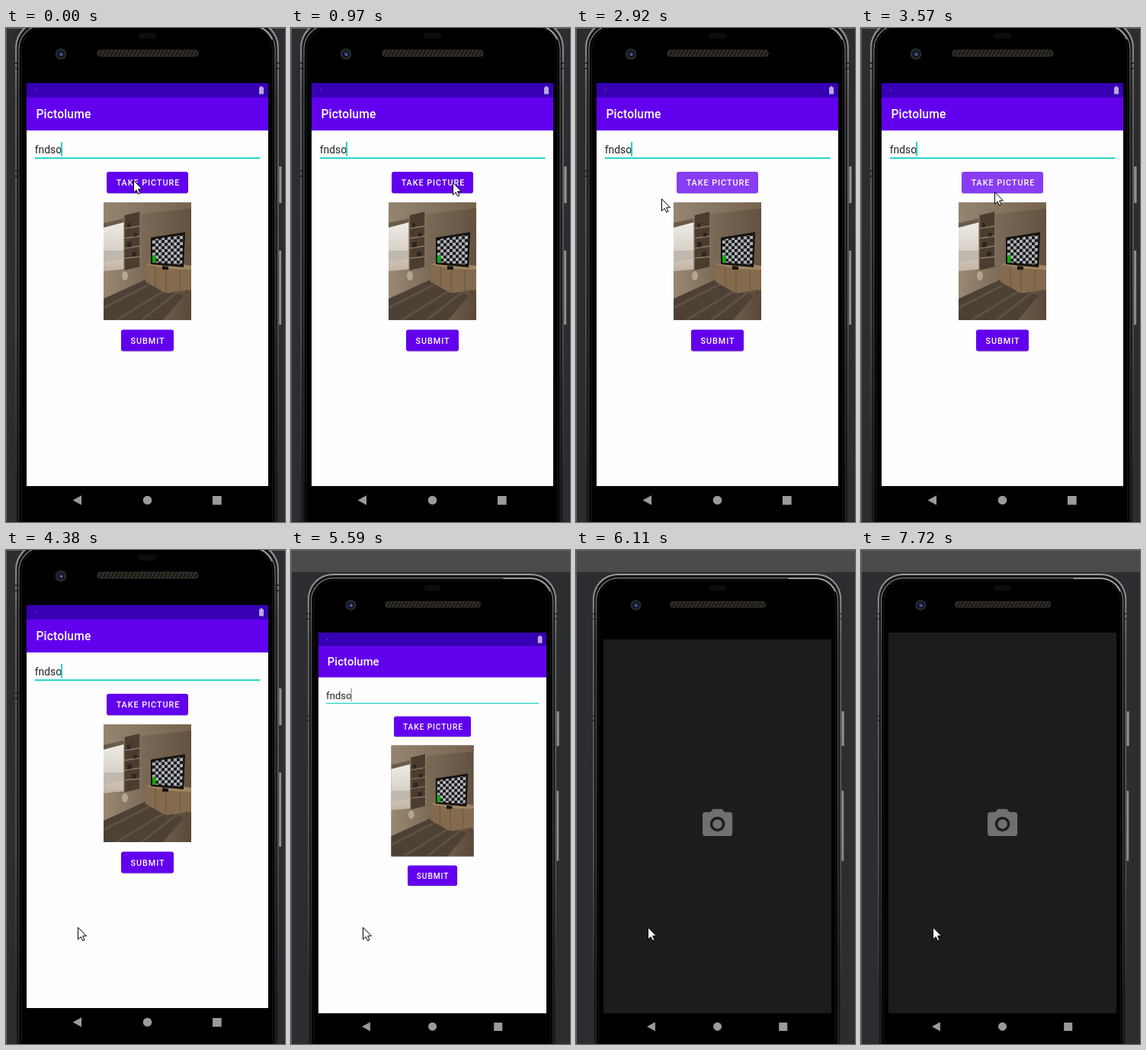
These frames come from a looping animation (366x646 px, 8 s). An HTML page:

```html
<!DOCTYPE html>
<html lang="en">
<head>
<meta charset="utf-8">
<title>Phone emulator</title>
<style>
  html, body { margin: 0; width: 100%; height: 100%; overflow: hidden; background: #2c2d31; }
  svg { display: block; width: 366px; height: 646px; font-family: Roboto, sans-serif; }
  .label { font-size: 10.8px; font-weight: 500; letter-spacing: .96px; fill: #fff; }
  #caret { fill: #03cdbb; }
  .far #caret { fill: #777; width: 1px; }
  .far #line { height: 1.1px; }
  #strip { display: none; }
  .far #strip { display: inline; }
</style>
</head>
<body>
<svg id="stage" viewBox="0 0 366 646">
  <defs>
    <linearGradient id="rim" x2="0" y2="1">
      <stop offset="0" stop-color="#9a9a9a"/><stop offset=".12" stop-color="#5e5e5e"/>
      <stop offset=".5" stop-color="#4a4a4a"/><stop offset=".75" stop-color="#2a2a2a"/>
    </linearGradient>
    <linearGradient id="key">
      <stop offset="0" stop-color="#4c4c4c"/><stop offset=".6" stop-color="#a0a0a0"/><stop offset="1" stop-color="#555"/>
    </linearGradient>
    <linearGradient id="wall"><stop offset="0" stop-color="#8d7c68"/><stop offset="1" stop-color="#62523f"/></linearGradient>
    <linearGradient id="ceiling"><stop offset="0" stop-color="#958570"/><stop offset="1" stop-color="#75634e"/></linearGradient>
    <linearGradient id="daylight" x2="0" y2="1">
      <stop offset="0" stop-color="#f0eeea"/><stop offset=".5" stop-color="#d8d1c8"/><stop offset="1" stop-color="#b5a591"/>
    </linearGradient>
    <linearGradient id="floor"><stop offset="0" stop-color="#9a8872"/><stop offset="1" stop-color="#5a4939"/></linearGradient>
    <pattern id="mesh" width="5" height="8" patternUnits="userSpaceOnUse" patternTransform="skewX(-30)">
      <rect width="5" height="8" fill="#191613"/><rect width="2" height="8" fill="#3b342c"/>
    </pattern>
    <pattern id="checker" width="8" height="8" patternUnits="userSpaceOnUse" patternTransform="skewY(-3)">
      <rect width="8" height="8" fill="#15161a"/><path d="M0 0h4v8h4v-4h-8z" fill="#b4b6ba"/>
    </pattern>
    <clipPath id="photo"><rect x="128" y="228" width="115" height="154"/></clipPath>
    <clipPath id="screen"><rect x="27" y="72" width="317" height="539"/></clipPath>
  </defs>

  <rect width="366" height="646" fill="#2c2d31"/>
  <rect id="strip" width="366" height="29" fill="#4a4c4a"/>
  <path d="M0 .5H366M.5 0V646" stroke="#626463"/>

  <g id="phone">
    <!-- body -->
    <rect x="357" y="181" width="5" height="48" rx="1" fill="url(#key)"/>
    <rect x="357" y="291" width="4.5" height="97" rx="1" fill="url(#key)"/>
    <rect x="12" y="-9.5" width="346" height="800" rx="35" fill="url(#rim)"/>
    <rect x="14.3" y="-7.5" width="341.4" height="798" rx="33" fill="#151515"/>
    <rect x="17" y="-3.5" width="336" height="792" rx="31" fill="#000" stroke="url(#rim)" stroke-width="1.1"/>
    <rect x="20.5" y="-1" width="329" height="790" rx="29" fill="#000" stroke="#222" stroke-width=".7"/>
    <path d="M284-3H322Q341-2 349 15" fill="none" stroke="#bbb" stroke-width="1.2"/>
    <path d="M12 46h4.5M12 53h4.5M12 187h4.5M12 194h4.5M353.500 46h4.500M353.500 53h4.500" stroke="#161616" stroke-width="1.3"/>
    <rect x="174" y="6" width="23" height="8" rx="4" fill="#0d0d0f"/>
    <circle cx="72" cy="34" r="7.3" fill="#2b2b2e"/>
    <circle cx="72" cy="34" r="5" fill="#10131f"/>
    <circle cx="72" cy="34" r="2.8" fill="#26366c"/>
    <circle cx="73" cy="35" r="1" fill="#8093d0"/>
    <rect x="120" y="29" width="132" height="8" rx="3" fill="url(#mesh)" stroke="#333" stroke-width="1"/>

    <g clip-path="url(#screen)">
      <g id="app">
        <rect x="27" y="72" width="317" height="527" fill="#fefefe"/>
        <rect x="27" y="72" width="317" height="19" fill="#3700b3"/>
        <rect x="27" y="90.700" width="317" height="43.300" fill="#6200ee"/>
        <text x="39.500" y="118" font-size="15.600" font-weight="500" letter-spacing=".15" fill="#fff">Pictolume</text>
        <text x="37.700" y="164" font-size="13.900" fill="#222">fndso</text>
        <rect id="caret" x="72.200" y="149" width="1.700" height="18.500"/>
        <rect id="line" x="38" y="169.300" width="295.500" height="1.700" fill="#03d2c0"/>

        <rect x="132" y="189" width="107" height="28" rx="3" opacity=".2"/>
        <rect id="take" x="132" y="188" width="107" height="28" rx="3"/>
        <text class="label" x="144.700" y="206">TAKE PICTURE</text>
        <rect x="151" y="395.500" width="69" height="28" rx="3" opacity=".2"/>
        <rect x="151" y="394.500" width="69" height="28" rx="3" fill="#6200ee"/>
        <text class="label" x="163.500" y="412.700">SUBMIT</text>

        <!-- room picture -->
        <g clip-path="url(#photo)">
          <rect x="128" y="228" width="115" height="154" fill="url(#wall)"/>
          <path d="M128 228H243V236L178 243 128 256Z" fill="url(#ceiling)"/>
          <path d="M128 256L155 250V331H128Z" fill="url(#daylight)"/>
          <path d="M128 291H155V302L128 306Z" fill="#bfb8af"/>
          <path d="M128 318L182 313 243 345V382H128Z" fill="url(#floor)"/>
          <path d="M128 255L155 249V254L128 261Z" fill="#6a5b4a"/>
          <path d="M155 245L176 240V312L155 317Z" fill="#4a3d30"/>
          <path d="M156 262L176 259M156 275L176 272M156 288L176 285M156 301L176 299M155 245V317M176 240V312" stroke="#8b7962" stroke-width="1.300"/>
          <path d="M159 261v-6h4v5zM167 273v-5h5v4zM159 287v-7h6v6zM165 299v-6h6v5z" fill="#2d251e"/>
          <ellipse cx="156" cy="324" rx="4" ry="6" fill="#b4a692"/>
          <path d="M128 354L183 329 233 350 206 382H128Z" fill="#4d4136"/>
          <path d="M128 366L193 333M145 382L212 341M178 382L224 346" stroke="#5f5143" stroke-width="3"/>
          <path d="M183 309L203 305 243 311 243 317 210 315Z" fill="#a08663"/>
          <path d="M183 309L210 315 243 316V342L210 347 183 332Z" fill="#846b4e"/>
          <path d="M210 315V347M196 312V339M228 316V344" stroke="#64503b" stroke-width=".8"/>
          <path d="M186 333v6M211 346v6M237 342v6" stroke="#57452f" stroke-width="1.500"/>
          <path d="M190 274L235 267 233 313 190 309Z" fill="#15130f"/>
          <path d="M192 276.500L232.500 270.500 231 309.500 192 306.500Z" fill="url(#checker)"/>
          <path d="M192 298l3-2 2 4-1 7h-4z" fill="#0ca90c"/>
          <path d="M205 311l8 1v4h-8z" fill="#191510"/>
        </g>
        <rect id="dim" x="27" y="72" width="317" height="527" opacity=".1"/>
      </g>

      <g id="camera">
        <rect x="27" y="72" width="317" height="600"/>
        <rect x="27" y="72" width="317" height="527" fill="#1c1c1c"/>
        <path transform="translate(160.700 312.300) scale(2.070)" fill="#707073" fill-rule="evenodd"
          d="M9 2 7.170 4H4a2 2 0 0 0-2 2v12a2 2 0 0 0 2 2h16a2 2 0 0 0 2-2V6a2 2 0 0 0-2-2h-3.170L15 2ZM12 7a5 5 0 0 1 0 10 5 5 0 0 1 0-10ZM12 8.800a3.200 3.200 0 0 0 0 6.400 3.200 3.200 0 0 0 0-6.400Z"/>
      </g>
      <rect id="bar" x="27" y="72" width="317"/>
    </g>

    <g id="status" fill="#b9a9df">
      <path d="M332 77.500h1.800v-1.500h2.400v1.500h1.800v9h-6z"/>
      <circle cx="39" cy="81" r=".7" opacity=".6"/>
    </g>
    <g fill="#9b9b9b">
      <path d="M87.500 617.500L99 611.200V623.800Z"/>
      <circle cx="185.500" cy="617.500" r="5.800"/>
      <rect x="271" y="612" width="11.700" height="11.500"/>
    </g>
  </g>

  <path id="cursor" d="M.5.500V16.200L4.100 12.800 6.600 18 9 16.900 6.600 11.800H11.500Z" fill="#fff" stroke="#000"/>
</svg>
<script>
const $ = id => document.getElementById(id);
const show = (id, on) => $(id).style.visibility = on ? 'visible' : 'hidden';
const between = (t, a, b) => t >= a && t < b;

// start time, then pointer x and y
const pointer = [
  [0, 167, 199], [280, 200, 420], [400, 223, 577], [550, 197, 314], [700, 197, 285],
  [820, 196, 250], [970, 212, 202], [1120, 212, 199], [1250, 211, 196],
  [2400, 185, 204], [2520, 140, 218], [2640, 112, 223],
  [3310, 140, 219], [3430, 172, 215], [3570, 175, 214], [3710, 177, 207], [3830, 178, 202],
  [4230, 134, 379], [4380, 94, 493]
];

// scale about the centre of the phone screen
const zoom = s => `translate(185.5 335.5) scale(${s}) translate(-185.5 -335.5)`;

function draw(t) {
  const [, x, y] = pointer.findLast(p => p[0] <= t);
  $('cursor').setAttribute('transform', `translate(${x} ${y})`);

  const far = t >= 5590, opening = t >= 5870, open = t >= 6110;
  $('stage').classList.toggle('far', far);
  $('phone').setAttribute('transform', far ? 'translate(36 108) scale(.9435 .9445) translate(-27 -72)' : '');

  show('caret', !between(t, 400, 970) && !between(t, 1380, 2090));
  $('take').setAttribute('fill', between(t, 2920, 3710) ? '#893df2' : between(t, 3710, 3830) ? '#751ff0' : '#6200ee');

  show('dim', opening);
  show('camera', opening);
  show('status', !open);
  $('status').setAttribute('fill', opening ? '#a5a5a5' : '#b9a9df');
  $('app').setAttribute('transform', zoom(opening ? 1.037 : 1));
  $('camera').setAttribute('transform', zoom(open ? 1 : t >= 5990 ? .992 : .974));
  $('bar').setAttribute('height', between(t, 6110, 7600) ? 9.5 : between(t, 7600, 7720) ? 4.5 : 0);
}

function tick() {
  draw(performance.now() % 8000);
  requestAnimationFrame(tick);
}
tick();
</script>
</body>
</html>
```
